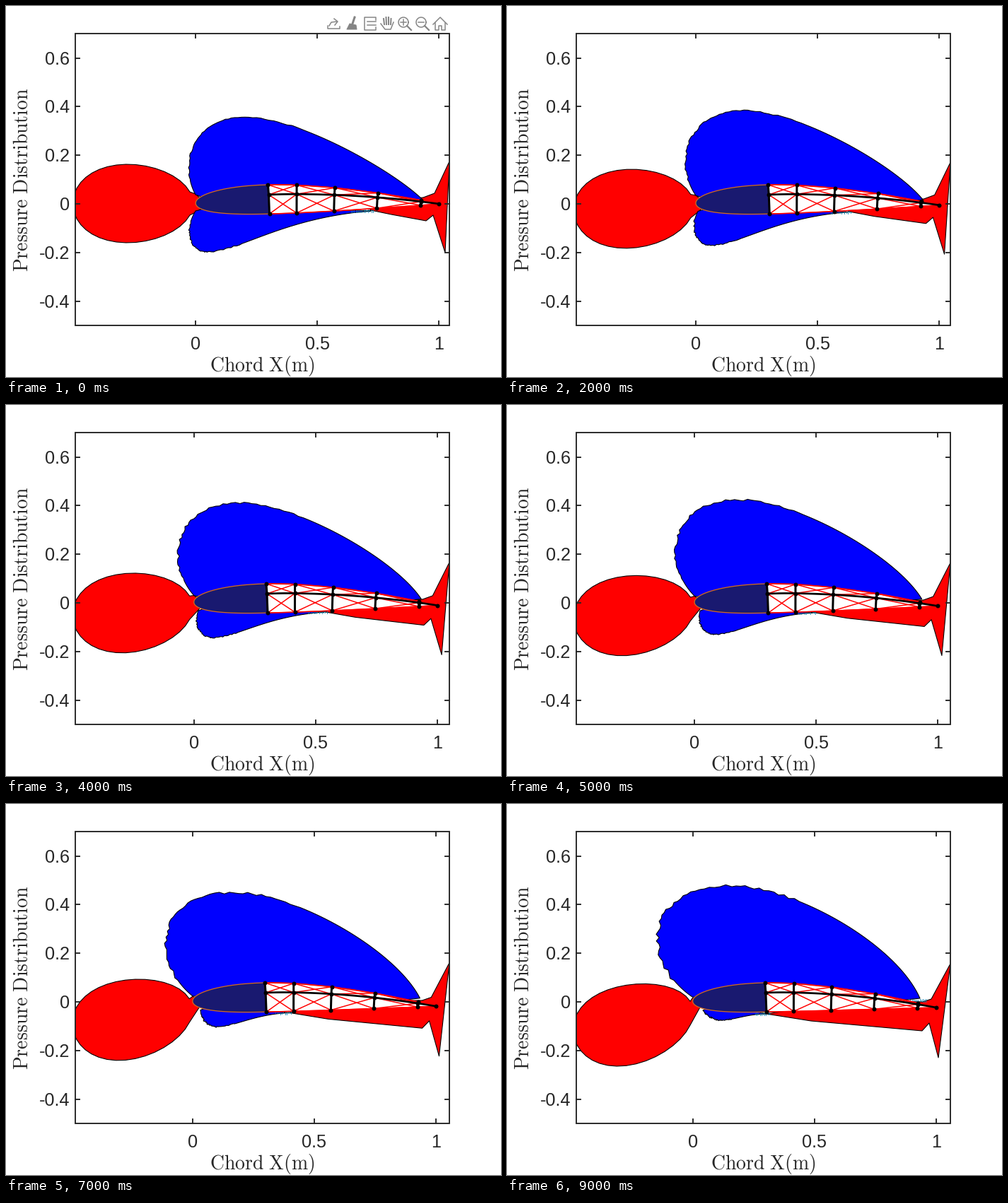
Animation of 700 by 525 pixels, one loop 10 s. Source, as a matplotlib script:

```python
import numpy as np
import matplotlib.pyplot as plt
from matplotlib.animation import FuncAnimation
from matplotlib.patches import Rectangle

W, H, DPI = 700, 525, 100
PX = 72 / DPI
FRAMES = 10
LEFT, RIGHT, TOP, BOTTOM = 98, 627, 39, 452
SCALE, ZERO = 344, 280
INK = "#262626"
ICON = "#858585"

# Bezier anchors and handles (pixels) at the first and last step.
UPPER = np.array([
    [(268, 267), (245, 225), (262, 157), (338, 157), (415, 157), (550, 235), (589, 274)],
    [(262, 273), (188, 222), (190, 116), (318, 116), (405, 116), (550, 197), (584, 275)]])
LOWER = np.array([
    [(268, 290), (250, 320), (262, 348), (284, 348), (330, 348), (390, 300), (516, 290)],
    [(277, 292), (283, 299), (290, 306), (303, 306), (320, 306), (340, 297), (367, 297)]])
# Corners of the straight-edged tail.
TAIL = np.array([
    [(516, 289), (545, 295), (594, 304), (604, 296), (621, 349), (627, 220),
     (606, 265), (590, 271)],
    [(367, 297), (430, 307), (587, 321), (597, 310), (610, 359), (627, 226),
     (600, 276), (588, 280)]])

plt.rcParams["mathtext.fontset"] = "cm"
plt.rcParams["font.family"] = "Liberation Sans"
fig = plt.figure(figsize=(W / DPI, H / DPI), dpi=DPI, facecolor="white")
ax = fig.add_axes([0, 0, 1, 1])


def mix(pair, e, bend=1.0):
    """Move from first to last pose; bend eases the horizontal part."""
    return pair[0] + (pair[1] - pair[0]) * np.array([e**bend, e])


def bezier(p, steps=45):
    t = np.linspace(0, 1, steps)[:, None]
    s = 1 - t
    return s**3 * p[0] + 3 * s * s * t * p[1] + 3 * s * t * t * p[2] + t**3 * p[3]


def lobe(p, amp, rng):
    """Two Bezier arcs, frayed along the normal over the rounded part."""
    curve = np.vstack([bezier(p[:4]), bezier(p[3:])[1:]])
    u = np.linspace(0, 2, len(curve))
    d = np.gradient(curve, axis=0)
    normal = np.column_stack([d[:, 1], -d[:, 0]]) / np.hypot(*d.T)[:, None]
    teeth = amp * ((u > 0.15) & (u < 1.3)) * np.where(u < 0.7, 1.5, 1)
    return curve + normal * (teeth * rng.uniform(-1, 1, len(u)))[:, None]


def front_lobe(e, x0):
    """Ellipse, longer towards the nose, whose axis bows as it sinks."""
    t = np.linspace(0.3, 2 * np.pi - 0.3, 36)
    c = np.cos(t)
    x = 172 - e + 85 * c + 7.5 * c**2
    y = 279.5 + 33.5 * e - e * (12 * c + 6 * c**2) - (55.5 + 1.5 * e) * np.sin(t)
    nose = [(x0 + 4 + 5 * e, 290), (x0 + 14, 280), (x0, 266 + 8 * e)]
    return np.vstack([np.column_stack([x, y]), nose])


def line(x, y, color, width, z=5, **kw):
    ax.plot(x, y, color=color, lw=width * PX, zorder=z, **kw)


def shape(pts, fill, edge="black", width=1.1, z=2):
    return ax.fill(*np.asarray(pts).T, facecolor=fill, edgecolor=edge,
                   lw=width * PX, zorder=z, joinstyle="round")[0]


def camber(x):
    return np.where(x < 0.4, 0.125 * (0.8 * x - x**2),
                    0.02 / 0.36 * (0.2 + 0.8 * x - x**2))


def slope(x):
    return np.where(x < 0.4, 0.125, 0.02 / 0.36) * (0.8 - 2 * x)


def thickness(x):
    return 0.6 * (0.2969 * np.sqrt(x) - 0.126 * x - 0.3516 * x**2
                  + 0.2843 * x**3 - 0.1036 * x**4)


def section(x, side, e, x0):
    """Pixel points on the upper (1), lower (-1) or middle (0) line."""
    half = side * thickness(x)
    rise = camber(x) + half if side else 2 * camber(x)
    sag = 8 * e * np.clip((x - 0.3) / 0.7, 0, 1) ** 1.5
    return np.column_stack([x0 + SCALE * (x - 2 * half * slope(x)),
                            ZERO - SCALE * rise + sag])


def strokes(lo, hi, y, rng):
    for x in np.arange(lo, hi, 2.2):
        a, b = rng.uniform(0.5, 2.5, 2)
        line([x, x], [y - a, y + b], "#0a82b4", 0.9, 4)


def airfoil(e, x0):
    s = np.linspace(0, 1, 60)
    nose, rear = 0.3 * s**2, 0.3 + 0.7 * s
    for x, fill, edge, z in ((rear, "white", "red", 5), (nose, "#191970", "#d2691e", 6)):
        shape(np.vstack([section(x, 1, e, x0), section(x, -1, e, x0)[::-1]]),
              fill, edge, 1.3, z)

    stations = np.array([0.3, 0.415, 0.57, 0.747, 0.925])
    up, mid, low = (section(stations, side, e, x0) for side in (1, 0, -1))
    tip = section(np.array([1.0]), 0, e, x0)
    for a, b in ((up, mid), (mid, up), (mid, low), (low, mid)):
        for p, q in zip(a[:-1], b[1:]):
            line([p[0], q[0]], [p[1], q[1]], "red", 1.5, 7)
    for p in (up, low):
        line(*np.vstack([p, tip]).T, "red", 1.5, 7)
    line(*section(rear, 0, e, x0).T, "black", 2.7, 8)
    for trio in zip(up, mid, low):
        line(*np.array(trio).T, "black", 3, 8)
    line(*np.vstack([up, mid, low, tip]).T, "black", 0, 9, marker="o", ms=6 * PX, mew=0)


def axes_box(x0):
    ax.add_patch(Rectangle((LEFT, TOP), RIGHT - LEFT, BOTTOM - TOP, fill=False,
                           ec=INK, lw=1.9 * PX, zorder=20))
    text = dict(color=INK, va="baseline")
    for v in (0, 0.5, 1):
        x = x0 + SCALE * v
        for y, d in ((BOTTOM, -6), (TOP, 6)):
            line([x, x], [y, y + d], INK, 1.9, 20)
        ax.text(x, 486, f"{v:g}", size=25.2 * PX, ha="center", **text)
    for k in range(-2, 4):
        y = ZERO - SCALE * 0.2 * k
        for x, d in ((LEFT, 6), (RIGHT, -6)):
            line([x, x + d], [y, y], INK, 1.9, 20)
        ax.text(90, y + 9, f"{0.2 * k:.2g}", size=25.2 * PX, ha="right", **text)
    text.update(size=27.8 * PX, ha="center", rotation_mode="anchor")
    ax.text(362.5, 517, r"$\mathrm{Chord\ X(m)}$", **text)
    ax.text(31, 245.5, r"$\mathrm{Pressure\ Distribution}$", rotation=90, **text)


def toolbar():
    def ink(*pts, w=1.5):
        line(*zip(*pts), ICON, w, 21)

    # share
    ink((455, 28), (455, 32), (472, 32), (472, 29))
    ink((457, 28), (460, 23), (468, 22))
    ink((464, 18), (469, 22), (465, 27))
    # brush
    ink((493, 16), (490, 25), w=3)
    shape([(486, 25), (495, 27), (496, 33), (482, 33)], ICON, ICON, 1, 21)
    # note
    ink((523, 20), (523, 16), (507, 16), (507, 34), (523, 34), (523, 30))
    for y in (22, 27):
        ink((511, y), (523, y))
    # hand
    for i, top in enumerate((18, 16, 16, 18)):
        ink((534 + 3.5 * i, top), (535 + 3 * i, 26), w=2)
    ink((530, 25), (536, 33), (544, 33), (548, 23))
    # magnifiers
    a = np.linspace(0, 2 * np.pi, 30)
    for x in (562, 587):
        line(x + 7 * np.cos(a), 23 + 7 * np.sin(a), ICON, 1.5, 21)
        ink((x + 5, 28), (x + 11, 34), w=2.2)
        ink((x - 4, 23), (x + 4, 23))
    ink((562, 19), (562, 27))
    # house
    ink((604, 26), (614, 16), (624, 26))
    ink((607, 24), (607, 34), (612, 34), (612, 28), (616, 28), (616, 34),
        (621, 34), (621, 24))


def draw(n):
    ax.clear()
    ax.set(xlim=(0, W), ylim=(H, 0))
    ax.axis("off")
    rng = np.random.default_rng(40 + n)
    e = n / (FRAMES - 1)
    x0 = 268.3 - 5.6 * e
    clip = Rectangle((LEFT, TOP), RIGHT - LEFT, BOTTOM - TOP, transform=ax.transData)

    # Each outline is closed through points hidden under the airfoil.
    tail = np.vstack([mix(TAIL, e), [(500, 278)]])
    up = np.vstack([lobe(mix(UPPER, e, 1.28), 0.8 + e, rng), [(565, 277), (290, 275)]])
    low = np.vstack([lobe(mix(LOWER, e), 0.8, rng), [(300, 282)]])
    for pts, fill in ((front_lobe(e, x0), "red"), (tail, "red"),
                      (up, "blue"), (low, "blue")):
        shape(pts, fill).set_clip_path(clip)

    end, y = mix(LOWER, e)[-1]
    strokes(end - 28 + 12 * e, end + 4, y, rng)
    if n >= 8:
        strokes(566, 594, 278, rng)
    airfoil(e, x0)
    axes_box(x0)
    if n < 2:
        toolbar()
    return []


anim = FuncAnimation(fig, draw, frames=FRAMES, init_func=lambda: draw(0),
                     interval=1000, repeat=True, repeat_delay=0, blit=False)
plt.show()
```
